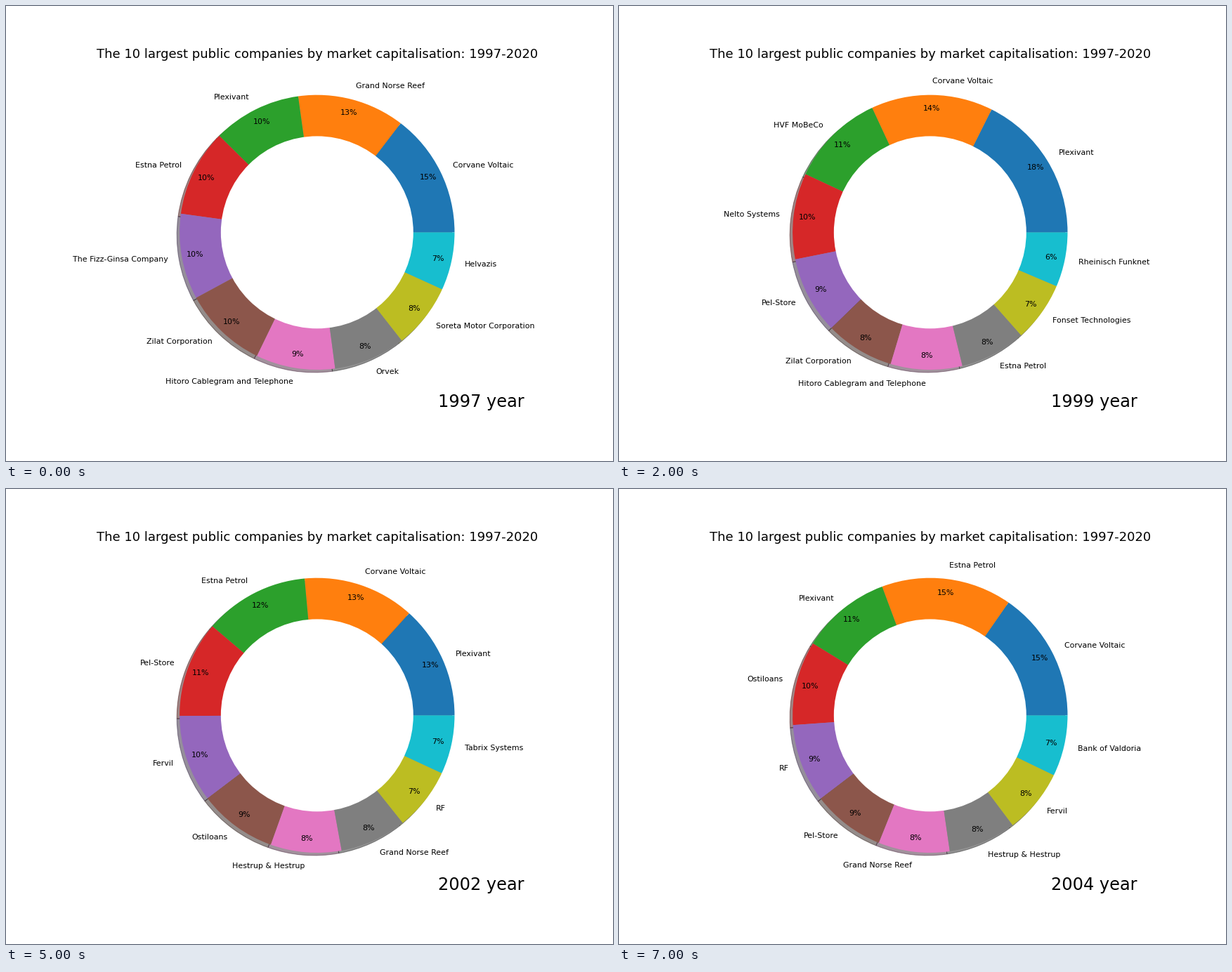
Animation, 864 px wide and 648 px high, one loop 8000 ms. Source, as a matplotlib script:

```python
import matplotlib.pyplot as plt
import numpy as np
from matplotlib.animation import FuncAnimation

W, H = 864, 648
FIRST_YEAR = 1997
Y_MIN, Y_MAX = -1.3, 1.25

VOLT, REEF, PLEX, PETROL = ("Corvane Voltaic", "Grand Norse Reef",
                            "Plexivant", "Estna Petrol")
FIZZ, ZILAT, PHONE, ORVEK = ("The Fizz-Ginsa Company", "Zilat Corporation",
                             "Hitoro Cablegram and Telephone", "Orvek")
STORE, NELTO, LOANS, FERVIL = ("Pel-Store", "Nelto Systems",
                               "Ostiloans", "Fervil")
TABRIX, RF, HESTRUP = "Tabrix Systems", "RF", "Hestrup & Hestrup"

# Per year: companies by rank, then the percentages of the first and second
# place and of both ends of the middle and lower groups
RANKING = [
    ([VOLT, REEF, PLEX, PETROL, FIZZ, ZILAT, PHONE, ORVEK,
      "Soreta Motor Corporation", "Helvazis"],
     (14.6, 12.6, 10.4, 9.9, 9.3, 6.8)),
    ([PLEX, VOLT, PETROL, REEF, ORVEK, FERVIL, ZILAT, FIZZ, STORE, TABRIX],
     (15.8, 15.1, 10.0, 8.6, 8.6, 7.3)),
    ([PLEX, VOLT, "HVF MoBeCo", NELTO, STORE, ZILAT, PHONE, PETROL,
      "Fonset Technologies", "Rheinisch Funknet"],
     (17.6, 14.3, 11.1, 8.1, 8.4, 6.4)),
    ([VOLT, NELTO, PETROL, FERVIL, PLEX, STORE, LOANS, "Ringavon",
      ZILAT, REEF],
     (17.3, 11.1, 10.3, 9.0, 9.0, 7.4)),
    ([VOLT, PLEX, PETROL, STORE, LOANS, FERVIL, ZILAT, RF, HESTRUP, REEF],
     (14.5, 12.7, 11.6, 9.6, 8.0, 7.4)),
    ([PLEX, VOLT, PETROL, STORE, FERVIL, LOANS, HESTRUP, REEF, RF, TABRIX],
     (13.3, 13.1, 12.3, 9.2, 8.3, 6.9)),
    ([VOLT, PLEX, PETROL, FERVIL, LOANS, STORE,
      "Casterian International Group", ZILAT, RF, "DKZB"],
     (12.9, 11.7, 11.4, 11.1, 8.0, 7.3)),
    ([VOLT, PETROL, PLEX, LOANS, RF, STORE, REEF, HESTRUP, FERVIL,
      "Bank of Valdoria"],
     (15.4, 15.4, 10.6, 8.6, 8.4, 7.2)),
]


def shares(first, second, mid_top, mid_end, low_top, low_end):
    """Ten shares: two leaders, then two evenly falling groups of four."""
    return np.r_[first, second,
                 np.linspace(mid_top, mid_end, 4),
                 np.linspace(low_top, low_end, 4)]


plt.rcParams["font.family"] = "DejaVu Sans"
fig = plt.figure(figsize=(W / 72, H / 72), dpi=72, facecolor="white")
ax = fig.add_axes([0.125, 0.11, 0.775, 0.77])

fig.text(442.8 / W, 574 / H, "The 10 largest public companies by market "
         "capitalisation: 1997-2020", fontsize=18, ha="center")
year_text = fig.text(676 / W, 77 / H, "", fontsize=24, ha="center")

# Half width of the view that keeps both axes at the same scale
X_HALF = (Y_MAX - Y_MIN) / 2 * (0.775 * W) / (0.77 * H)


def draw(i):
    names, keys = RANKING[i]
    ax.clear()
    ax.pie(shares(*keys), labels=names, autopct="%1.0f%%",
           pctdistance=0.9, labeldistance=1.1, shadow=True,
           textprops={"fontsize": 11})
    ax.add_artist(plt.Circle((0, 0), 0.7, fc="white"))
    ax.set_xlim(-X_HALF, X_HALF)
    ax.set_ylim(Y_MIN, Y_MAX)
    year_text.set_text(f"{FIRST_YEAR + i} year")
    return []


anim = FuncAnimation(fig, draw, frames=len(RANKING), interval=1000,
                     repeat=True, blit=False)
plt.show()
```
